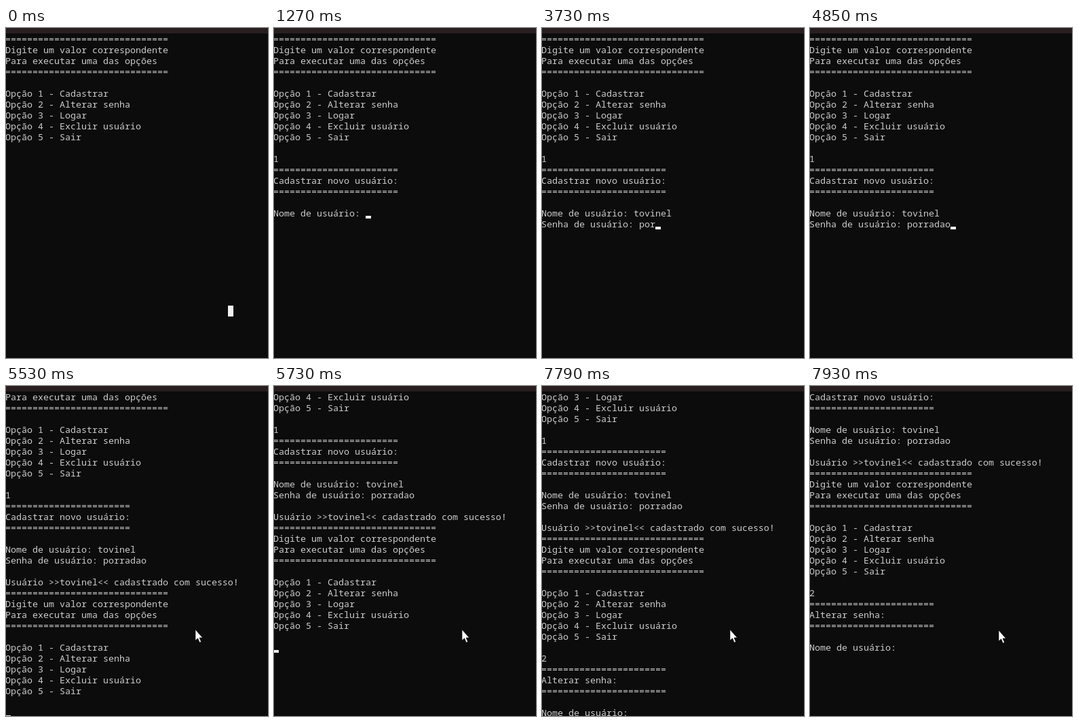
Animation, 386 px wide and 485 px high, one loop 8000 ms. Source, as an HTML page:

```html
<!DOCTYPE html>
<html lang="pt">
<head>
<meta charset="utf-8">
<style>
  html, body { margin: 0; width: 100%; height: 100%; overflow: hidden; background: #0c0c0c; }
  body { position: relative; }
  body > * { position: absolute; }
  #bar { left: 0; top: 0; width: 100%; height: 8px; background: #281e1f; }
  #text { left: -1px; top: 8px; margin: 0; color: #ccc;
          font: 13.3333px/16px "Noto Sans Mono", "DejaVu Sans Mono", monospace; }
  #caret { width: 8px; height: 4px; background: #f2f2f2; }
  #block { left: 327px; top: 408px; width: 8px; height: 16px; background: #f2f2f2; }
  #mouse { left: 0; top: 0; width: 14px; height: 22px; }
</style>
</head>
<body>
<pre id="text"></pre>
<div id="caret"></div>
<div id="block"></div>
<svg id="mouse"><path d="M0 0V16L3.6 12.8L6.2 19L8.6 18L6 12H10.6Z" fill="#fff" stroke="#000" stroke-width=".6"/></svg>
<div id="bar"></div>
<script>
const LOOP = 8000, ROW = 16, COL = 8, TOP = 8;
const $ = id => document.getElementById(id);
const box = (title, width) => `${'='.repeat(width)}\n${title}\n${'='.repeat(width)}\n`;
const menu = box('Digite um valor correspondente\nPara executar uma das opções', 30) + '\n' +
  ['Cadastrar', 'Alterar senha', 'Logar', 'Excluir usuário', 'Sair']
    .map((name, i) => `Opção ${i + 1} - ${name}\n`).join('') + '\n';
const user = 'tovinel', password = 'porradao';
const typed = (word, times) => times.map((t, i) => [t, word[i]]);

// Everything printed or typed, in order of time
const prints = [
  [0, menu],
  [660, '1'],
  [1270, '\n' + box('Cadastrar novo usuário:', 23) + '\nNome de usuário: '],
  ...typed(user, [1730, 1930, 2200, 2400, 2600, 2730, 2800]),
  [3150, '\nSenha de usuário: '],
  ...typed(password, [3470, 3600, 3730, 3930, 4130, 4270, 4470, 4670]),
  [4980, `\n\nUsuário >>${user}<< cadastrado com sucesso!\n${menu}`],
  [6000, '2'],
  [6730, '\n' + box('Alterar senha:', 23)],
  [6800, '\nNome de usuário: ']
];
const caretOff = [[0, 130], [1210, 1270], [2270, 2400], [3270, 3470],
  [3870, 3930], [4400, 4470], [6330, 6460], [7790, LOOP]];
const scrolls = [[0, 0], [4980, 2], [5600, 5], [5730, 8], [6800, 7], [7860, 10], [7930, 13]];
const pointer = [[5330, 363, 384], [5400, 322, 366], [5470, 290, 359],
  [5530, 279, 358], [5670, 277, 358], [7860, 278, 359]];

const past = (list, t) => list.filter(item => item[0] <= t);
const show = (el, on) => el.style.visibility = on ? 'visible' : 'hidden';

function draw(t) {
  const lines = past(prints, t).map(p => p[1]).join('').split('\n');
  const scroll = past(scrolls, t).pop()[1];
  const content = lines.slice(scroll).join('\n');
  if ($('text').textContent !== content) $('text').textContent = content;

  const row = lines.length - 1;
  $('caret').style.left = lines[row].length * COL - 1 + 'px';
  $('caret').style.top = TOP + (row - scroll + 1) * ROW - 4 + 'px';
  show($('caret'), !caretOff.some(([from, to]) => t >= from && t < to));
  show($('block'), t < 660);

  const spot = past(pointer, t).pop();
  show($('mouse'), spot);
  if (spot) $('mouse').style.transform = `translate(${spot[1]}px, ${spot[2]}px)`;
}

const start = performance.now();
function tick() {
  draw((performance.now() - start) % LOOP);
  requestAnimationFrame(tick);
}
tick();
</script>
</body>
</html>
```
